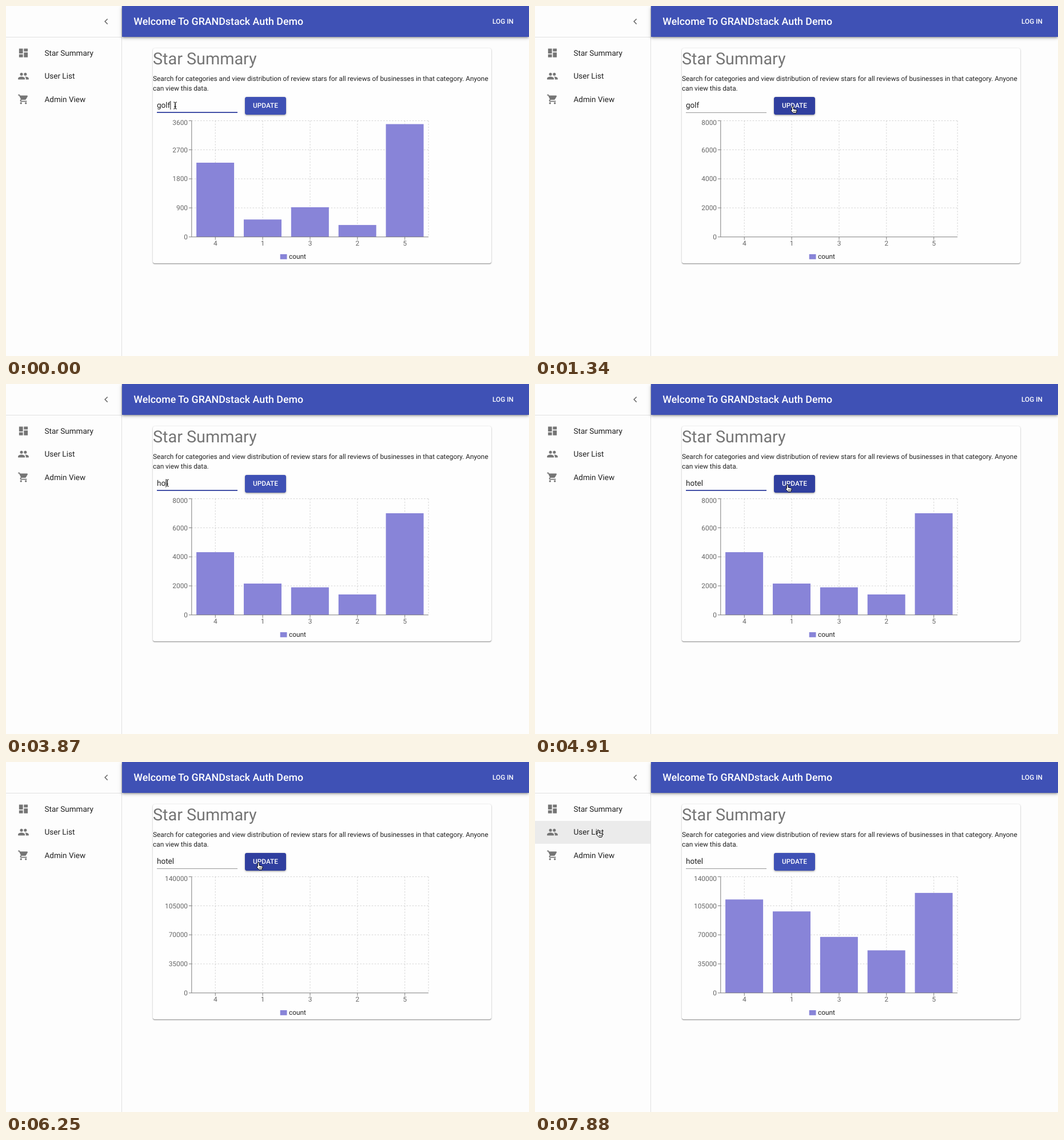
An HTML page for the animation above (8000 ms loop, 915 by 612 pixels).

```html
<!DOCTYPE html>
<html lang="en">
<head>
<meta charset="utf-8">
<title>Star Summary</title>
<style>
html, body { margin: 0; width: 100%; height: 100%; overflow: hidden; background: #fdfdfd; }
div, svg { position: absolute; box-sizing: border-box; }
#drawer { left: 0; top: 0; width: 203px; height: 612px; background: #fdfdfd; border-right: 1px solid #e0e0e0; }
#divider { left: 0; top: 54px; width: 202px; height: 1px; background: #e0e0e0; }
#hover { left: 0; top: 102.5px; width: 202px; height: 40.5px; background: #ebebeb; }
#header { left: 203px; top: 0; width: 712px; height: 54px; background: #3f51b5;
  box-shadow: 0 1.7px 3.4px -.8px #0006, 0 3.4px 4.2px #0000002b, 0 .8px 8.5px #00000024; }
#card { left: 257px; top: 74px; width: 592px; background: #fefefe; border-radius: 3.4px;
  box-shadow: 0 .8px 2.5px #0000004d, 0 .8px .8px #0003, 0 1.7px .8px -.8px #00000026; }
#button { left: 418px; top: 159px; width: 72px; height: 31px; border-radius: 3.4px;
  box-shadow: 0 .8px 4.2px #0003, 0 1.7px 1.7px #00000024, 0 2.5px .8px -1.7px #0000001f; }
svg { left: 0; top: 0; }
text { font-family: Roboto, sans-serif; font-size: 11.85px; fill: #212121; text-rendering: geometricPrecision; }
.title { font-size: 17.77px; font-weight: 500; fill: #fff; }
.heading { font-size: 28.77px; fill: #757575; }
.body { font-size: 13.54px; }
.action { font-weight: 500; fill: #fff; }
.tick { fill: #666; }
.end { text-anchor: end; }
.mid { text-anchor: middle; }
.icon { fill: #757575; }
.axis { stroke: #666; stroke-width: .85; fill: none; }
.grid { stroke: #ccc; stroke-width: .85; stroke-dasharray: 2.54; fill: none; }
.bar { fill: #8884d8; }
</style>
</head>
<body>
<div id="drawer"><div id="divider"></div><div id="hover"></div></div>
<div id="header"></div>
<div id="card"></div>
<div id="button"></div>
<svg width="915" height="612" viewBox="0 0 915 612">
  <defs>
    <path id="stem" d="M-2.5-6q2.500 0 2.500 1.500v9q0 1.500-2.500 1.500M2.500-6q-2.500 0-2.500 1.500v9q0 1.500 2.500 1.500M-1.500 2h3"/>
  </defs>
  <g class="icon">
    <path transform="translate(165.2 16.9) scale(.846)" d="M15.4 7.4L14 6l-6 6 6 6 1.4-1.4L10.8 12z"/>
    <path transform="translate(20.3 71.9) scale(.846)" d="M3 13h8V3H3zm0 8h8v-6H3zm10 0h8V11h-8zm0-18v6h8V3z"/>
    <g transform="translate(20.3 112.5) scale(.846)">
      <circle cx="8" cy="8" r="3"/><circle cx="16" cy="8" r="3"/>
      <path d="M8 13c-2.3 0-7 1.2-7 3.5V19h14v-2.5C15 14.2 10.3 13 8 13zM16 13l-1 .1c1.2.8 2 1.9 2 3.4V19h6v-2.5c0-2.3-4.7-3.5-7-3.5z"/>
    </g>
    <g transform="translate(20.3 153) scale(.846)">
      <circle cx="7" cy="20" r="2"/><circle cx="17" cy="20" r="2"/>
      <path d="M1 2v2h2l3.6 7.6-1.4 2.4C4.5 15.3 5.5 17 7 17h12v-2H7.4l-.2-.4.9-1.6h7.4c.8 0 1.4-.4 1.8-1L21 5.5 20 4H5.2L4.3 2z"/>
    </g>
  </g>
  <text class="body" x="67.5" y="86.5">Star Summary</text>
  <text class="body" x="67.5" y="127">User List</text>
  <text class="body" x="67.5" y="167.7">Admin View</text>
  <text class="title" x="223.3" y="33">Welcome To GRANDstack Auth Demo</text>
  <text class="action" x="851" y="31.3">LOG IN</text>
  <text class="heading" x="257" y="101.7">Star Summary</text>
  <text x="257" y="131.3">Search for categories and view distribution of review stars for all reviews of businesses in that category. Anyone</text>
  <text x="257" y="148.2">can view this data.</text>
  <rect id="selection" x="264" y="165" width="24" height="16" fill="#b4d5fe"/>
  <text id="field" class="body" x="264" y="178"></text>
  <rect id="caret" y="166" width="1" height="15" fill="#212121"/>
  <rect id="underline" x="264" width="141"/>
  <text class="action mid" x="454" y="178">UPDATE</text>
  <text id="loading" x="257" y="220">Loading...</text>
  <g id="chart"></g>
  <g id="cursor" stroke-linejoin="round" stroke-linecap="round">
    <g id="beam" fill="none">
      <use href="#stem" stroke="#fff" stroke-width="2.6"/>
      <use href="#stem" stroke="#111"/>
    </g>
    <path id="arrow" fill="#000" stroke="#fff" d="M0 0v13l3-2.8 2 4.6 2-.9-2-4.4h4z"/>
    <g id="hand" stroke="#000">
      <path fill="#fff" d="M3.5 1C4.5 1 5 1.7 5 2.5V6l4.500 1c1.2.3 1.7 1 1.5 2l-.6 3-.9 1.5H5L1.2 9.5C.2 8.2 1.3 7.2 2.3 7.9V2.5C2.3 1.6 2.7 1 3.5 1z"/>
      <path stroke-width=".7" d="M5.5 9.500v2M7.2 9.500v2M8.900 9.500v2"/>
    </g>
  </g>
</svg>
<script>
const LOOP = 8000, GROW = 430;
const BASE = 403.8, PLOT = 203.2, LEFT = 324.8, RIGHT = 739.2;
const PITCH = (RIGHT - LEFT) / 5;
const stars = [4, 1, 3, 2, 5];
const datasets = [
  { max: 3600, counts: [2300, 540, 920, 370, 3495] },
  { max: 8000, counts: [4320, 2160, 1900, 1410, 7000] },
  { max: 140000, counts: [112600, 98200, 67500, 51300, 120500] }
];

// Each entry holds until the next one and changes only the listed properties.
const timeline = [
  [0, { cursor: 'beam', x: 296, y: 174, text: 'golf', caret: true, focus: true, selected: false,
        over: false, menu: false, loading: false, data: 0, grownFrom: -GROW }],
  [300, { x: 350, y: 176 }],
  [450, { cursor: 'hand', x: 440, y: 174, over: true }],
  [600, { x: 447 }],
  [740, { caret: false, focus: false }],
  [1040, { loading: true }],
  [1340, { loading: false, data: 1, grownFrom: 1340 }],
  [1490, {}], [1640, {}], [1790, {}], [1940, {}],
  [2240, { x: 428 }],
  [2390, { cursor: 'beam', x: 350, y: 176, over: false }],
  [2530, { x: 300, y: 174 }],
  [2680, { x: 282, y: 173 }],
  [2830, { focus: true, caret: true }],
  [2970, { selected: true, caret: false }],
  [3870, { text: 'ho', selected: false, caret: true }],
  [4010, { text: 'hote' }],
  [4160, { text: 'hotel' }],
  [4610, { x: 335, y: 176, caret: false }],
  [4760, { cursor: 'hand', x: 430, y: 175, over: true }],
  [4910, { x: 438 }],
  [5200, { focus: false }],
  [5350, { loading: true }],
  [6250, { loading: false, data: 2, grownFrom: 6250 }],
  [6390, {}], [6540, {}], [6680, {}],
  [7580, { cursor: 'arrow', x: 395, y: 172, over: false }],
  [7730, { x: 230, y: 146 }],
  [7880, { cursor: 'hand', x: 107, y: 118, menu: true }]
];

const $ = id => document.getElementById(id);
const show = (id, on) => { $(id).style.display = on ? '' : 'none'; };

function add(tag, attrs, text = '') {
  const node = document.createElementNS('http://www.w3.org/2000/svg', tag);
  for (const key in attrs) node.setAttribute(key, attrs[key]);
  node.textContent = text;
  return $('chart').appendChild(node);
}

// Fixed chart parts; bars and value labels are kept for updating.
const labels = [], bars = [];
for (let i = 0; i < 5; i++) {
  const x = LEFT + PITCH * (i + .5), y = BASE - PLOT * i / 4;
  if (i) add('path', { class: 'grid', d: `M${LEFT} ${y}H${RIGHT}` });
  add('path', { class: 'grid', d: `M${x} ${BASE - PLOT}V${BASE}` });
  add('path', { class: 'axis', d: `M${LEFT - 5} ${y}h5M${x} ${BASE}v5` });
  labels.push(add('text', { class: 'tick end', x: 318, y: i < 4 ? y + 4.2 : 208.3 }));
  add('text', { class: 'tick mid', x, y: 419 }, stars[i]);
}
add('path', { class: 'grid', d: `M${RIGHT} ${BASE - PLOT}V${BASE}` });
for (let i = 0; i < 5; i++)
  bars.push(add('rect', { class: 'bar', x: LEFT + PITCH * (i + .1), width: 66 }));
add('path', { class: 'axis', d: `M${LEFT} ${BASE - PLOT}V${BASE}H${RIGHT}` });
add('rect', { class: 'bar', x: 479.7, y: 434, width: 11.8, height: 8.8 });
add('text', { x: 495, y: 442 }, 'count');

// CSS "ease": cubic-bezier(.25, .1, .25, 1)
function ease(p) {
  if (p <= 0 || p >= 1) return p <= 0 ? 0 : 1;
  const bezier = (s, a, b) => 3 * s * (1 - s) * ((1 - s) * a + s * b) + s ** 3;
  let low = 0, high = 1;
  for (let i = 0; i < 20; i++) {
    const s = (low + high) / 2;
    if (bezier(s, .25, .25) < p) low = s; else high = s;
  }
  return bezier(low, .1, 1);
}

function stateAt(time) {
  const state = {};
  for (const [start, change] of timeline) {
    if (start > time) break;
    Object.assign(state, change, { start });
  }
  return state;
}

function draw(time) {
  const s = stateAt(time);
  $('hover').style.opacity = s.menu ? 1 : 0;
  $('button').style.background = s.over ? '#303f9f' : '#3f51b5';
  $('card').style.height = (s.loading ? 151 : 376) + 'px';
  show('loading', s.loading);
  show('chart', !s.loading);

  $('field').textContent = s.text;
  show('selection', s.selected);
  show('caret', s.caret);
  $('caret').setAttribute('x', 264 + $('field').getComputedTextLength());
  const line = $('underline');
  line.setAttribute('y', s.focus ? 185.2 : 186);
  line.setAttribute('height', s.focus ? 1.8 : .9);
  line.setAttribute('fill', s.focus ? '#303f9f' : '#8c8c8c');

  const { max, counts } = datasets[s.data];
  const growth = ease((s.start - s.grownFrom) / GROW);
  counts.forEach((count, i) => {
    const height = PLOT * count / max * growth;
    bars[i].setAttribute('y', BASE - height);
    bars[i].setAttribute('height', height);
    labels[i].textContent = max * i / 4;
  });

  for (const kind of ['beam', 'arrow', 'hand']) show(kind, kind === s.cursor);
  $('cursor').setAttribute('transform', `translate(${s.x} ${s.y})`);
}

const began = performance.now();
function frame() {
  draw((performance.now() - began) % LOOP);
  requestAnimationFrame(frame);
}
frame();
</script>
</body>
</html>
```
